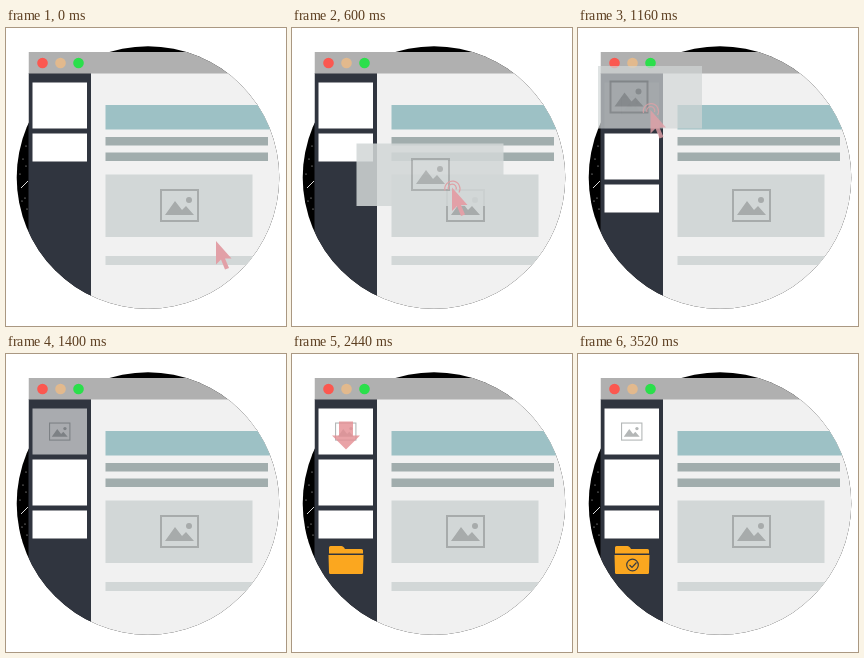
An HTML page for the animation above (4.28 s loop, 280x298 px).

```html
<!DOCTYPE html>
<html lang="en">
<head>
<meta charset="utf-8">
<title>Drag to collect</title>
<style>
html, body { margin: 0; width: 100%; height: 100%; overflow: hidden; background: #fff; }
svg { display: block; width: 280px; height: 298px; }
</style>
</head>
<body>
<svg viewBox="0 0 280 298">
  <defs>
    <clipPath id="view">
      <circle cx="142" cy="149.5" r="131.3"/>
      <rect x="22.5" y="24" width="119" height="126"/>
    </clipPath>
    <clipPath id="dragClip"><rect id="dragBox" x="-30" y="0" width="400" height="298"/></clipPath>
    <g id="icon">
      <rect x="1" y="1" width="37" height="31" fill="none" stroke="#a7abab" stroke-width="2"/>
      <path d="M5 26 15 12 22 21 26 17 34 26Z" fill="#a7abab"/>
      <circle cx="29" cy="11" r="3" fill="#a7abab"/>
    </g>
    <g id="card">
      <rect width="147" height="62.5" fill="#d2d7d7"/>
      <use href="#icon" x="54.5" y="14.5"/>
    </g>
  </defs>

  <circle cx="142" cy="149.5" r="131.3" fill="#000"/>
  <g id="stars" fill="#ccc"></g>
  <path d="M15 160 22 153" stroke="#ddd"/>

  <g clip-path="url(#view)">
    <rect x="22.5" y="45" width="62.5" height="250" fill="#30353f"/>
    <rect x="85" y="45" width="195" height="250" fill="#f1f1f1"/>
    <rect x="22.5" y="24" width="258" height="21.5" fill="#b0b0b0"/>
    <circle cx="36.5" cy="35" r="5.3" fill="#fb5850"/>
    <circle cx="54.5" cy="35" r="5.3" fill="#e2b98d"/>
    <circle cx="72.5" cy="35" r="5.3" fill="#2bdf4b"/>
    <rect x="99.5" y="77" width="180" height="24.5" fill="#9dc1c5"/>
    <rect x="99.5" y="109" width="162.5" height="8.5" fill="#a1adad"/>
    <rect x="99.5" y="124.5" width="162.5" height="8.5" fill="#a1adad"/>
    <use href="#card" x="99.5" y="146.5"/>
    <rect x="99.5" y="228" width="147" height="9" fill="#d2d7d7"/>

    <g id="list" fill="#fff">
      <rect x="26.5" y="54.5" width="54.5" height="46"/>
      <rect x="26.5" y="105.5" width="54.5" height="28"/>
    </g>
    <g id="thumb">
      <rect x="26.5" y="54.5" width="54.5" height="46" fill="#fff"/>
      <use href="#icon" transform="translate(43 68.5) scale(.55)" opacity=".85"/>
    </g>
    <g id="folder">
      <path d="M37 199.500V193.500Q37 192 38.500 192H49.500Q51 192 52 193.500L53 195H69.500Q71 195 71 196.500V199.500Z"/>
      <path d="M36.500 201H71.500L71 218.500Q71 220 69.500 220H38.500Q37 220 37 218.500Z"/>
    </g>
    <g id="check" fill="none" stroke="#3b3d40" stroke-width="1.200">
      <circle cx="54.500" cy="211" r="5.800"/>
      <path d="M51.500 211 54 213.500 58.500 208.500"/>
    </g>
    <path id="arrow" d="M-7-14H7V0H14L0 14-14 0H-7Z" fill="#e58f94" opacity=".82"/>
  </g>

  <g id="drag" clip-path="url(#dragClip)"><use id="copy" href="#card" opacity=".86"/></g>
  <g id="cursor">
    <path d="M0 0V23.500L5 18.500 9 28.500 13 27 9 17.500H15.500Z" fill="#e2a0a7"/>
    <g id="ripple" fill="none" stroke="#dfa1a6" stroke-width="1.200">
      <path d="M-3.500 2A4 4 0 1 1 4 2"/>
      <path d="M-7 3A7.600 7.600 0 1 1 7 5"/>
    </g>
  </g>
</svg>
<script>
const LOOP = 4280, STEP = 40;
const $ = id => document.getElementById(id);
const ramp = (t, a, b) => Math.min(1, Math.max(0, (t - a) / (b - a)));
const mix = (a, b, k) => a + (b - a) * k;
const set = (id, name, value) => $(id).setAttribute(name, value);
const move = (id, x, y, s = 1) => set(id, 'transform', `translate(${x} ${y}) scale(${s})`);
const fade = (id, k) => set(id, 'opacity', k);

const stars = [[17, 131], [20, 138], [14, 146], [19, 170], [21, 181], [20, 118], [16, 173]];
$('stars').innerHTML = stars.map(([x, y]) => `<circle cx="${x}" cy="${y}" r=".6"/>`).join('');

// Dark sidebar to grey to orange
function folderColor(k) {
  const stops = [[48, 53, 63], [104, 98, 90], [251, 167, 31]];
  const i = k < .5 ? 0 : 1;
  const rgb = stops[i].map((c, n) => Math.round(mix(c, stops[i + 1][n], k * 2 - i)));
  return `rgb(${rgb})`;
}

function draw(t) {
  const pull = ramp(t, 520, 800);
  const x = mix(99.5, -23, pull), y = mix(146.5, 38, pull);
  const near = 1 - ramp(t, 0, 400);
  const leave = 1 - ramp(t, 1120, 1320);

  move('copy', x, y);
  fade('drag', t > 520 ? leave : 0);
  set('dragBox', 'x', mix(-30, 20, ramp(t, 800, 920)));
  move('cursor', x + 95.5 + 15 * near, y + 44 + 22.5 * near);
  fade('cursor', leave);
  fade('ripple', ramp(t, 400, 480));

  move('list', 0, 51 * ramp(t, 720, 920));
  fade('thumb', ramp(t, 1120, 1600));

  const show = ramp(t, 1720, 2040);
  fade('folder', show > 0 ? 1 : 0);
  set('folder', 'fill', folderColor(show));

  const fall = ramp(t, 2440, 3000);
  move('arrow', 54, mix(81.5, 189, fall), t < 2440 ? 0 : 1 - fall);
  fade('check', ramp(t, 3280, 3520));
}

const start = performance.now();
function tick() {
  const t = (performance.now() - start) % LOOP;
  draw(Math.floor(t / STEP) * STEP);
  requestAnimationFrame(tick);
}
tick();
</script>
</body>
</html>
```
